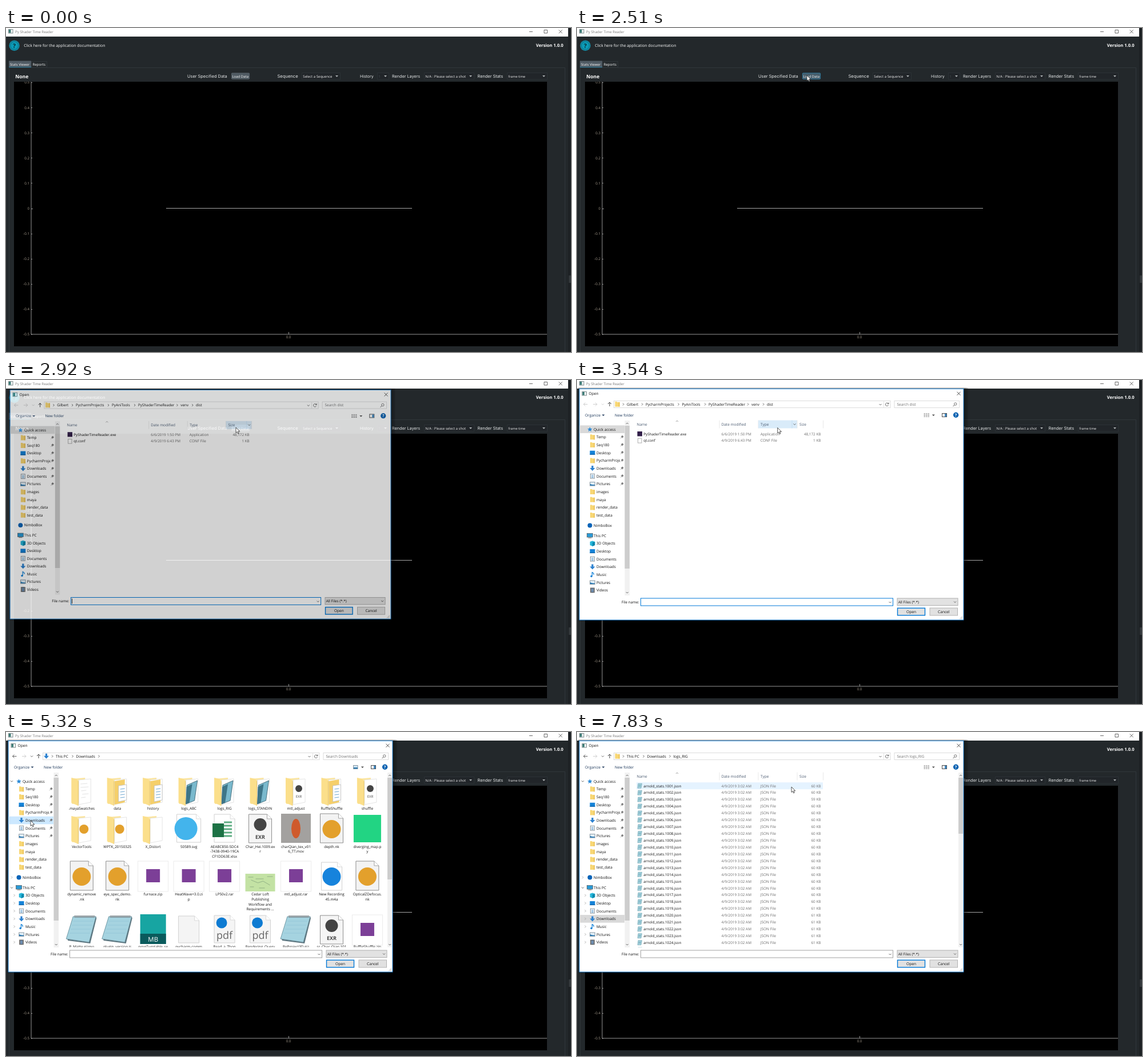
Animation of 988 by 567 pixels, one loop 7.99 s. Source, as an HTML page:

```html
<!DOCTYPE html>
<html lang="en">
<head>
<meta charset="utf-8">
<title>Py Shader Time Reader</title>
<style>
html, body { margin: 0; width: 100%; height: 100%; overflow: hidden; background: #1d2124; }
svg { display: block; width: 988px; height: 567px; font-family: "Open Sans", "Noto Sans", sans-serif; text-rendering: geometricPrecision; }
text { white-space: pre; }
</style>
</head>
<body>
<svg viewBox="0 0 988 567">
<defs>
<clipPath id="pane"><rect x="93" y="70" width="582" height="306.5"/></clipPath>
<clipPath id="side"><rect x="4" y="70" width="71" height="310"/></clipPath>
</defs>
<g id="app"></g><g id="dialog"></g><g id="cursor"></g>
</svg>
<script>
const LOOP = 7990;
const BLUE = '#0078d7', HOVER = '#e5f3ff', PICK = '#cce8ff', GREY = '#6d6d6d';

// Drawing helpers
const R = (x, y, w, h, fill, more = '') => `<rect x="${x}" y="${y}" width="${w}" height="${h}" fill="${fill}" ${more}/>`;
const O = (x, y, r, fill, more = '') => `<circle cx="${x}" cy="${y}" r="${r}" fill="${fill}" ${more}/>`;
const P = (d, fill = 'none', stroke = 'none', w = .8) => `<path d="${d}" fill="${fill}" stroke="${stroke}" stroke-width="${w}"/>`;
const T = (x, y, s, size = 6.5, fill = '#111', more = '') => `<text x="${x}" y="${y}" font-size="${size}" fill="${fill}" ${more}>${s}</text>`;
const box = (x, y, w, h, fill, stroke) => R(x, y, w, h, fill, `stroke="${stroke}" stroke-width="1"`);
const at = (x, y, s) => `<g transform="translate(${x} ${y})">${s}</g>`;
const MID = 'text-anchor="middle"', END = 'text-anchor="end"';
const chevron = (x, y, dir, c = '#444') => P({
  d: `M${x - 2} ${y - 1}l2 2 2-2`, u: `M${x - 2} ${y + 1}l2-2 2 2`, r: `M${x - 1} ${y - 2}l2 2-2 2`
}[dir], 'none', c);
const caret = (x, y, c) => P(`M${x - 2.5} ${y - 1.2}h5l-2.5 2.6Z`, c);
const cross = (x, y, c) => P(`M${x - 3} ${y - 3}l6 6m0-6l-6 6`, 'none', c);
const windowIcon = (x, y) => box(x + .5, y + .5, 7.5, 6.5, '#f4f6f6', '#7d8a8c') + R(x + 1, y + 1, 3.5, 5.5, '#3f7f79');

function app(hot) {
  const bg = '#23282b', axis = '#969696', tick = '#a59b8c';
  const label = (x, s, z = 7.4) => T(x, 86.8, s, z, '#e4e6e7', 'font-family="Inter, sans-serif"');
  const combo = (x, w, s, z = 6.1, c = '#f0f0f0') =>
    box(x + .5, 78.5, w, 11.5, '#212529', '#2b3135') + T(x + 2.3, 86.5, s, z, c) + caret(x + w - 5.5, 84.3, '#b4b8ba');
  let s = R(0, 0, 988, 567, '#1d2124') + R(0, 15, 983, 552, bg) + R(0, 0, 983, 15, '#fff')
    + R(984, 433, 4, 13, '#33383b') + windowIcon(4, 2) + T(16, 9.3, 'Py Shader Time Reader', 6.2, '#777')
    + P('M915 6.5h6M941 3.5h5.5v5.5h-5.5Z', 'none', '#444') + cross(969.7, 6.3, '#444')
    + O(14.6, 30.8, 9.2, '#128ba5') + O(14.6, 30.8, 6.8, '#0b9cb8', 'stroke="#0a6f85" stroke-width=".8"')
    + T(14.6, 34.6, '?', 10.5, '#0b2a33', MID + ' font-weight="700"')
    + T(31.2, 33.3, 'Click here for the application documentation', 6.87, '#fff')
    + T(974.5, 33.4, 'Version 1.0.0', 7.6, '#fff', END + ' font-weight="700"')
    + P('M5.5 567V69.5H977.5V567', 'none', '#30373b', 1)
    + box(44.5, 58.5, 27, 10.5, '#24292c', '#2e3539') + R(5, 57.5, 39, 11.5, '#505b64') + R(5, 68, 39, 1, '#2d7fa0')
    + T(6.8, 65.6, 'Stats Viewer', 6.05, '#fff') + T(46.5, 65.6, 'Reports', 6.2, '#fff')
    + T(16.3, 87.8, 'None', 8.6, '#fff', 'font-weight="700"')
    + label(317, 'User Specified Data') + label(474.5, 'Sequence', 7.6) + label(619, 'History', 7)
    + label(675, 'Render Layers', 7.22) + label(824.5, 'Render Stats')
    + R(394.4, 78.9, 31.2, 10.4, hot ? '#465d6b' : '#4f5a62', `rx="1" stroke="${hot ? '#3384ab' : '#59646b'}" stroke-width=".9"`)
    + T(395.5, 86.5, 'Load Data', 6, '#fff')
    + combo(517, 67, 'Select a Sequence') + combo(649, 20, '1', 6, '#4d5458')
    + combo(731, 87, 'N/A : Please select a shot') + combo(876, 70, 'frame time', 5.8)
    + R(14, 94, 932, 463, '#000');
  for (let i = 0; i <= 10; i++) {
    const y = 95 + i * 44.1;
    s += T(41, y + 2.4, i === 5 ? '0' : (.5 - i / 10).toFixed(1), 6.2, tick, END) + R(44, Math.round(y), i === 5 ? 3 : 2, 1, axis);
  }
  return s + R(14, 90, 30, 4, bg) + R(43.5, 94, 1, 442.5, axis) + R(44, 535.5, 902, 1, axis)
    + R(494, 532, 1, 4, axis) + T(494, 542.6, '0.0', 6.2, tick, MID) + R(280, 315, 430, 1, '#a6a6a6');
}

// Sidebar: name, icon, y
const small = {
  star: P('M0-4l1.2 2.8 3 .2-2.3 2 .8 3-2.7-1.7-2.7 1.7.8-3-2.3-2 3-.2Z', '#2b8ad6'),
  folder: P('M-4-4.5h3l1 1h4v8h-8Z', '#f8d775') + R(2.5, -3.5, 1.5, 8, '#e9bf52'),
  desk: R(-4.5, -3.5, 9, 7, '#1583d8') + R(-4.5, 2.3, 9, 1.2, '#0b5fa5'),
  down: P('M-1.6-4.5h3.2v4h3l-4.6 5-4.6-5h3Z', '#2d82d0'),
  doc: box(-3.5, -4, 7, 8, '#fff', '#8b97a0') + P('M-2-1.5h4M-2 .5h4M-2 2.3h4', 'none', '#3b87c2'),
  pic: box(-4.3, -3.2, 8.6, 6.4, '#e4f2fa', '#8b97a0') + P('M-4 2.8v-3l3 1.2 5 .4v1.4Z', '#2879b5'),
  cloud: O(0, 0, 4, '#0a64b8'),
  pc: R(-5, -4, 10, 6.5, '#2a9ad6', 'stroke="#555" stroke-width=".7"') + R(-3, 3.3, 6, .9, '#666'),
  cube: P('M-4.3-3l4.3-1.5 4.3 1.5v6l-4.3 2-4.3-2Z', '#28b6d8') + P('M0-1.5l4.3-1.5v6l-4.3 2Z', '#0a87ad'),
  note: P('M-.6 3v-7q3 1 3 4.2', 'none', '#1a86d9', 1.3) + O(-1.8, 3, 1.8, '#1a86d9'),
  film: R(-4, -4.3, 8, 8.6, '#444') + R(-2, -3.3, 4, 6.6, '#6d8db0') + P('M-3-4v8M3-4v8', 'none', '#ddd', .7)
};
const places = ['Quick access,star', 'Temp,folder', 'Seq180,folder', 'Desktop,desk', 'PycharmProjects,folder', 'Downloads,down',
  'Documents,doc', 'Pictures,pic', 'images,folder', 'maya,folder', 'render_data,folder', 'test_data,folder', 'NimboBox,cloud',
  'This PC,pc', '3D Objects,cube', 'Desktop,desk', 'Documents,doc', 'Downloads,down', 'Music,note', 'Pictures,pic', 'Videos,film']
  .map((p, i) => [...p.split(','), 86.2 + i * 13.67 + (i > 11 ? 4.2 : 0) + (i > 12 ? 4.4 : 0) - (i > 13 ? .3 : 0)]);

function sidebar(t, cx, cy) {
  const open = t > 3540 && (t >= 4320 || cx < 92);
  const picked = t < 4860 ? 0 : t < 7585 ? 5 : 17;
  return places.map(([name, icon, y], i) => {
    const root = [0, 12, 13].includes(i);
    const over = cx < 83 && Math.abs(cy - y) < 6.8;
    const fill = i === picked ? (i === 5 ? PICK : '#d9d9d9') : over ? HOVER : '';
    return (fill ? R(4.5, y - 6.8, 78.5, 13.6, fill) : '') + at(root ? 22.5 : 27, y, small[icon])
      + `<g clip-path="url(#side)">${T(root ? 29 : 34, y + 2.3, name, 6.5)}</g>`
      + (i > 0 && i < 8 ? P(`M76 ${y + 2.5}l2-2m-1.2-1.2l2.6 2.6M77.4 ${y - 1}l2-1.7 1.8 1.8-1.6 2Z`, '#777', '#777', .6) : '')
      + (open && (root || i > 13) ? chevron(root ? 10 : 14.5, y, i === 0 || i === 13 ? 'd' : 'r', i === 0 || i === 13 ? '#444' : '#a0a0a0') : '');
  }).join('') + scrollbar(83.5, 330);
}

const scrollbar = (x, end) => R(x, 71, 8.5, 306, '#f1f1f1') + R(x, 80, 8.5, end - 80, '#cdcdcd')
  + chevron(x + 4.2, 76, 'u') + chevron(x + 4.2, 372, 'd');

// Detail list
const columns = [[104, 249], [249, 317], [317, 385], [385, 430.5]];
const pad = P('M1.5-4h6.5l-1.5 8h-6Z', '#a9d5df', '#5f98a8', .6) + P('M2.5-1.5h4M2-.2h4M2 1.2h4', 'none', '#5795a8', .5);
const appIcon = R(0, -4.2, 8.5, 8.4, '#33204a');
const paper = box(1, -3.8, 6.5, 7.8, '#fff', '#b0b0b0');

function list(rows, cx, cy) {
  const head = ['Name', 'Date modified', 'Type', 'Size'].map((name, i) => {
    const [a, b] = columns[i];
    const over = cy < 84.5 && cx >= a && cx < b;
    return (over ? R(a, 70.5, b - a, 14, '#d9ebf9') + P(`M${b - 9} 70.5v14`, 'none', '#b9d7ee', .6) + chevron(b - 4.5, 77.5, 'd') : '')
      + R(b - .4, 70.5, .8, 14, '#e3e3e3') + T([104.5, 252.5, 321, 389][i], 80, name, 6.5, '#4a5a70');
  }).join('');
  return head + chevron(175, 72, 'u', '#888') + rows.map(([icon, name, date, type, size], i) => {
    const y = 94.2 + i * 11.935;
    const over = cx > 104 && cx < 430 && cy > 88 && Math.abs(cy - y) < 5.97;
    return (over ? R(104, y - 6, 326, 12, HOVER) : '') + at(105.5, y, icon) + T(116.3, y + 2.3, name, 6.3)
      + T(252.5, y + 2.3, date, 6.4, GREY) + T(320.7, y + 2.3, type, 6.5, GREY) + T(426.5, y + 2.3, size, 6.4, GREY, END);
  }).join('');
}
const distRows = [[appIcon, 'PyShaderTimeReader.exe', '6/6/2019 1:50 PM', 'Application', '48,172 KB'],
  [paper, 'qt.conf', '4/9/2019 6:43 PM', 'CONF File', '1 KB']];
const statRows = Array.from({ length: 25 }, (_, i) => [pad, `arnold_stats.${1001 + i}.json`, '4/9/2019 3:02 AM',
  'JSON File', (i === 2 ? 59 : i < 18 ? 60 : 61) + ' KB']);

// Large icons, drawn around a top centre point
const sheet = (w, h, y = 0, fill = '#fff', edge = '#d0d0d0') =>
  P(`M${-w} ${y}H${w - 8}l8 8V${y + h}H${-w}Z`, fill, edge, 1) + P(`M${w - 8} ${y}v8h8`, '#fff', edge, .8);
const folder = inner => P('M-17 6L6 4V47L-17 50Z', '#fbe5a0') + P('M-5 8L16 6V47L-5 51Z', '#fff', '#dedede') + inner
  + P('M-18 4L-9 6L-6 10V53L-18 48Z', '#fbdf8b') + P('M-6 10V53', 'none', '#e8c566', .8);
const scribble = P('M-2 15l12-1M-2 21l14-1M-1 27l9-1M1 33l11-1M-1 39l8-1', 'none', '#cfcfcf', .6);
const tile = fill => R(-26.5, 0, 53, 53, '#fff', 'stroke="#ececec"') + R(-12, 14, 24, 23, fill);
const notebook = P('M-15 3H25L13 48L-27 42Z', '#a5d3e0', '#5b8795') + P('M13 48L25 3l1 3L15 50L-24 45l-1-2.500Z', '#5c7680')
  + P('M-13 3h36', 'none', '#59646a', 3) + P('M-13 3h36', 'none', '#d6e4e8', 1)
  + P('M-15 11h35M-17 18h35M-19 25h35M-21 32h35', 'none', '#8cc0d0', .6);
const pdf = sheet(18, 48, 1, '#f5f5f5') + O(-5, 14, 9.5, '#0e7bd2') + T(0, 42, 'pdf', 18, '#666', MID);
const art = {
  blank: sheet(18, 47, 2, '#f4f4f4'),
  paper: folder(scribble),
  empty: folder(''),
  data: folder(P('M-5 10L13 7V47L-5 51Z', '#f5cf6a') + P('M2 18L16 16V43L2 46Z', '#fff', '#bbb')
    + P('M5 24l8-1M5 29l8-1M5 34l8-1M5 39l8-1', 'none', '#4a90c4')),
  logs: folder(P('M-3 17L15 9L10 44L-5 50Z', '#7ab9cd', '#355b69') + P('M-4 20L6 15L1 48L-5 50Z', '#3e7588')),
  exrs: folder(O(5, 23, 6, '#444') + T(5, 39, 'EXR', 6, '#444', MID)),
  nukes: folder(O(4, 27, 8, '#e3a02c')),
  svg: sheet(21, 49, 1) + O(-5, 26, 20, '#43b4ec'),
  xlsx: sheet(18, 49, 1) + P('M-1 15h14M-1 21h14M-1 27h14M-1 33h14M-1 39h14', 'none', '#5fae83', 3) + R(-21, 17, 20, 24, '#1d7245'),
  exr: sheet(20, 50, 1, '#f5f5f5', '#8d8d8d') + O(0, 19, 11, '#444') + T(0, 43.5, 'EXR', 9, '#444', MID + ' font-weight="700"'),
  mov: R(-26, 0, 52, 51, '#a3a19f') + '<ellipse cx="0" cy="26" rx="8" ry="17" fill="#cf5a2c"/>',
  nuke: sheet(20, 51, 0, '#f3f3f3', '#8d8d8d') + O(0, 27, 16, '#e3a02c'),
  py: R(-24, 2, 48, 48, '#22d483'),
  comm: tile('#22d483'),
  zip: tile('#7c3f97'),
  map: R(-26, 22, 52, 31, '#c3e2a4') + P('M-21 28h9m4 3h14m6-4h10M-16 33l12 5 9-3 12 7M-18 45h7m9 2h10', 'none', '#7d9d78', .7),
  m4a: sheet(18, 49, 2) + O(0, 27, 16, '#1683dc'),
  pad: notebook,
  mb: R(-22.500, -1, 45, 52, '#17a5a2') + R(-22.5, 33, 45, 18, '#0a5a5c') + T(0, 47, 'MB', 11.5, '#fff', MID),
  pdf
};
const items = `paper:.mayaSwatches;data:data;data:history;logs:logs_ABC;logs:logs_RIG;logs:logs_STANDIN;exrs:mtl_adjust;data:RuffleShuffle;exrs:shuffle;
nukes:VectorTools;nukes:WPTK_20150325;empty:X_Distort;svg:50589.svg;xlsx:AEABC850-5DC4|-7438-0940-19CA|CF1DD63E.xlsx;exr:Char_Hei.1009.ex|r;mov:charQian_tex_v01|6_TT.mov;nuke:depth.nk;py:diverging_map.p|y;
nuke:dynamic_remove|.nk;nuke:eye_spec_demo.|nk;zip:furnace.zip;zip:HeatWave+3.0.zi|p;zip:LP50v2.rar;map:Cedar Loft|Publishing|Workflow and|Requirements ...;zip:mtl_adjust.rar;m4a:New Recording|45.m4a;nuke:OpticalZDefocus.|nk;
pad:P_Matte.gizmo;pad:plugin_version.js;mb:propTurntable_se;blank:pycharm-comm;pdf:Read_a_Thon;pdf:Rendering_Query;pad:ReProject3D.giz;exr:sr_Char_Qian.101;zip:RuffleShuffle.zip`
  .split(';').map(s => s.trim().split(':'));
const tops = [76, 143, 226, 320], labels = [136.3, 202.8, 286.3, 377.5];

function grid(t, cx, cy) {
  return items.map(([kind, label], i) => {
    const row = Math.floor(i / 9), left = 102.3 + i % 9 * 62.45, x = left + 30;
    if (t < 5090 + row * 76) kind = 'blank';
    else if (kind === 'empty' && t > 6600) kind = 'paper';
    else if (kind === 'blank' && t >= 6740) kind = 'comm';
    const over = row === 0 && cy < 140 && cx > left && cx < left + 60;
    return (over ? R(left, 74, 60, 66, t >= 7360 ? PICK : HOVER) : '') + at(x, tops[row], art[kind])
      + label.split('|').map((s, k) => T(x, labels[row] + k * 8.6, s, 6.35, '#111', MID)).join('');
  }).join('') + scrollbar(667, 258);
}

function dialog(t, cx, cy) {
  if (t < 2840) return '';
  const stage = t < 5010 ? 0 : t < 7510 ? 1 : 2;
  const gap = t >= 4940 && t < 5010 || t >= 7435 && t < 7510;
  const view = gap ? '' : stage === 0 ? list(distRows, cx, cy) : stage === 1 ? grid(t, cx, cy) : list(statRows, cx, cy) + scrollbar(667, 178);
  const crumbs = [
    [[87, 'Gilbert'], [120, 'PycharmProjects'], [183.5, 'PyAniTools'], [230, 'PyShaderTimeReader'], [305, 'venv'], [332, 'dist']],
    [[87, 'This PC'], [122.5, 'Downloads'], [168.5, '']],
    [[87, 'This PC'], [122.5, 'Downloads'], [168.5, 'logs_RIG']]][stage];
  const focus = t < 4860, pale = '#c4c4c4', ink = '#444';
  const shadow = [8, 5, 2].map(d => R(4 - d / 4, 15 - d / 4, 672 + d * 1.2, 405 + d / 2, '#000', 'opacity=".16"')).join('');
  const s = shadow + box(4, 15.5, 672, 404.5, '#fff', '#1a7fd0')
    + windowIcon(8.5, 20) + T(20.5, 26.3, 'Open', 6.6) + cross(667.5, 23.7, '#222')
    + P('M18.500 42.500h-7m3-3l-3 3 3 3', 'none', stage ? ink : pale) + P('M28 42.500h7m-3-3l3 3-3 3', 'none', pale)
    + chevron(45, 42.5, 'd', stage ? ink : pale) + P('M57 46v-7m-3 3l3-3 3 3', 'none', ink, 1)
    + box(64.5, 36.5, 483.5, 12, '#fff', '#dcdcdc') + at(70.5, 42.3, small[stage === 1 ? 'down' : 'folder'])
    + crumbs.map(([x, name]) => chevron(x - 6, 42.5, 'r') + T(x, 44.7, name, 6.4)).join('')
    + chevron(530.5, 43, 'd') + R(536, 37, .8, 11.5, '#dcdcdc')
    + P('M544.5 41.5a2.700 2.700 0 1 0 0 2.500M545 39.500v2.300h-2.300', 'none', ink)
    + box(555, 36.5, 113.5, 12, '#fff', '#dcdcdc') + T(559.5, 44.8, 'Search ' + ['dist', 'Downloads', 'logs_RIG'][stage], 6.5, GREY)
    + O(661.7, 42, 2.2, 'none', 'stroke="#555" stroke-width=".8"') + P('M660 43.700l-2.500 2.500', 'none', '#555', 1)
    + T(14, 63.9, 'Organize', 6.5, '#1e395b') + caret(46, 61.7, '#1e395b') + T(66, 63.9, 'New folder', 6.5, '#1e395b')
    + (stage === 1 ? box(607.5, 58.5, 7.5, 6, '#cfe6f5', '#8a97a0') + R(608, 62, 7, 2.5, '#3a7fb0')
      : P('M606.500 59h2.500m1 0h2.500m1 0h2.500M606.500 61.500h2.500m1 0h2.500m1 0h2.500M606.500 64h2.500m1 0h2.500m1 0h2.500', 'none', '#777', 1.1))
    + caret(623.3, 61.7, ink) + box(638.5, 58.5, 8, 6, '#fff', '#4d4d4d') + R(643, 59, 3.2, 5.3, '#3f87c0')
    + O(662.6, 61.3, 4.7, '#0a62b1') + T(662.6, 64, '?', 7.3, '#fff', MID + ' font-weight="700"')
    + sidebar(t, cx, cy) + `<g clip-path="url(#pane)">${view}</g>`
    + T(108.5, 390.8, 'File name:', 6.4, '#111', END) + box(111.5, 382, 441, 13, '#fff', focus ? BLUE : '#a2a2a2')
    + (t < 3300 || t >= 3850 && t < 4320 ? R(113, 384, .9, 9, '#111') : '') + chevron(547.5, 389, 'd')
    + box(560, 382, 106, 12.5, '#e2e2e2', '#b0b0b0') + T(561.7, 390.8, 'All Files (*.*)', 6.4) + chevron(661, 388.5, 'd')
    + R(560.5, 399.2, 48, 12.6, '#e1e1e1', `stroke="${BLUE}" stroke-width="1.4"`) + T(584.5, 407.9, 'Open', 6.6, '#111', MID)
    + box(617, 399, 48.5, 13, '#e1e1e1', '#b3b3b3') + T(641.3, 407.9, 'Cancel', 6.6, '#111', MID)
    + P('M669 418.500l5-5M671.500 418.500l2.500-2.500', 'none', '#a5a5a5');
  const [alpha, k] = t < 2920 ? [.45, .97] : t < 2990 ? [.82, .991] : t < 3060 ? [.95, .997] : [1, 1];
  return `<g opacity="${alpha}" transform="translate(340 217.5) scale(${k}) translate(-340 -217.5)">${s}</g>`;
}

// Pointer moves: start, end, steps, x, y, bend of the vertical part
const moves = [[500, 1290, 11, 440, 90, .7], [1380, 1690, 5, 401, 82, 1], [1920, 1920, 1, 402, 83, 1], [3540, 4320, 11, 39, 148, 2],
  [4700, 4700, 1, 43, 149, 1], [4860, 4860, 1, 43, 155, 1], [5870, 6650, 11, 373, 95, .5], [6740, 6820, 2, 375, 96, 1]];

function pointer(t) {
  let x = 930, y = 438;
  for (const [a, b, n, tx, ty, bend] of moves) {
    if (t < a) break;
    const p = t >= b ? 1 : (Math.floor((t - a) / (b - a) * (n - 1) + .02) + 1) / n;
    x += (tx - x) * (1 - (1 - p) ** 1.6);
    y += (ty - y) * p ** bend;
  }
  return [x, y];
}
const arrow = P('M0 0V9.500l2.200-2 1.500 3.400 1.600-.700-1.500-3.300h3Z', '#fff', '#111', .7);

const shown = {};
function put(id, html) {
  if (shown[id] !== html) document.getElementById(id).innerHTML = shown[id] = html;
}
function render(t) {
  const [x, y] = pointer(t);
  put('app', app(t >= 1380 && x < 426 && y < 90 && t < 2840));
  put('dialog', dialog(t, x, y));
  put('cursor', t < 500 ? '' : at(x.toFixed(1), y.toFixed(1), arrow));
}

const start = performance.now();
function tick() {
  render((performance.now() - start) % LOOP);
  requestAnimationFrame(tick);
}
tick();
</script>
</body>
</html>
```
